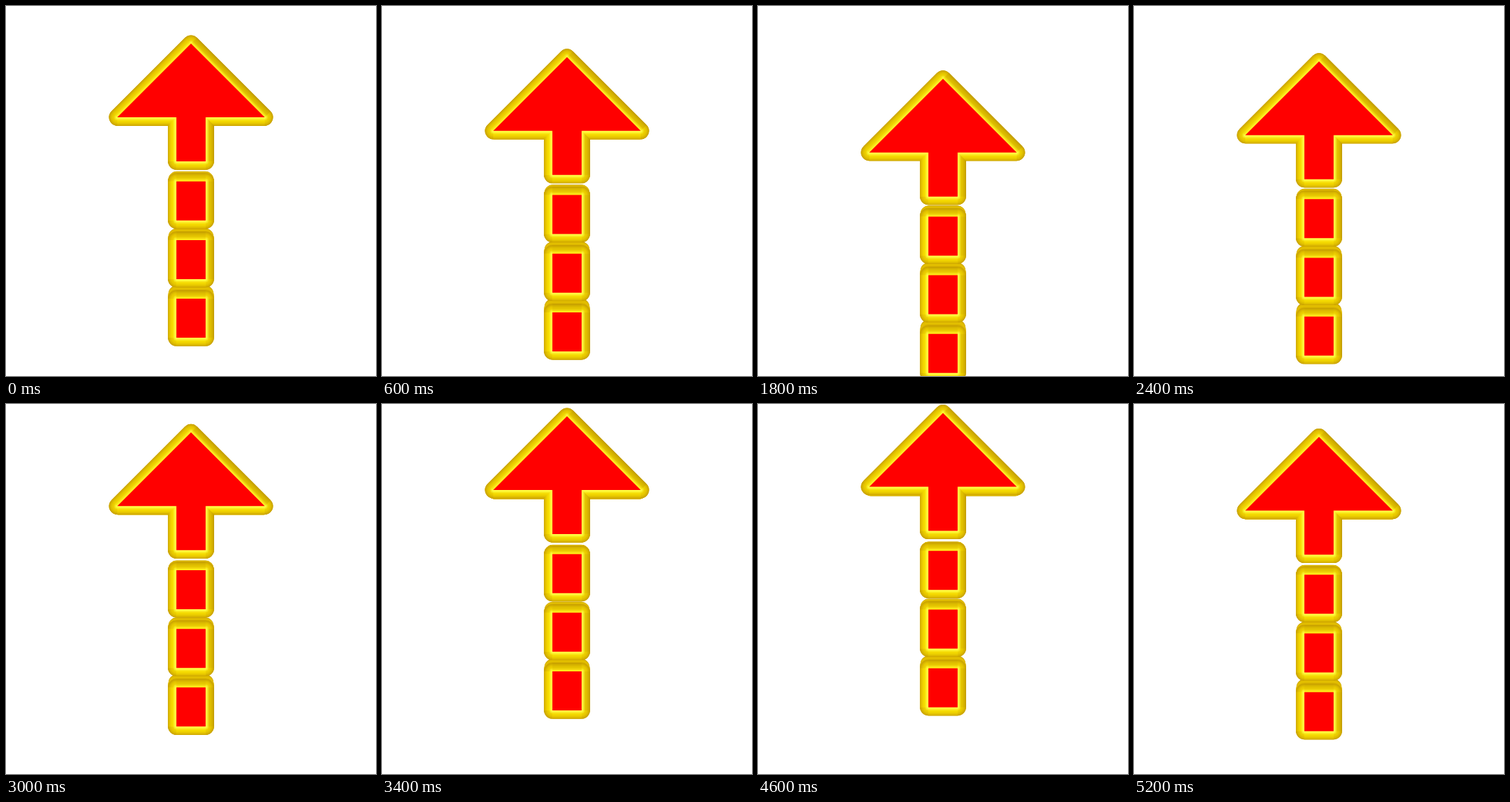
These frames come from a looping animation (512x512 px, 5300 ms). An HTML page with a canvas:

```html
<!DOCTYPE html>
<html lang="en">
<head>
<meta charset="utf-8">
<title>Bobbing arrow</title>
<style>
  html, body { margin: 0; width: 100%; height: 100%; overflow: hidden; background: #fff; }
  canvas { display: block; width: 100vw; height: 100vh; }
</style>
</head>
<body>
<canvas id="stage" width="512" height="512"></canvas>
<script>
const ctx = document.getElementById('stage').getContext('2d');
const BEVEL = 11.5, DEPTH = 0.029, EYE_Y = 162, SWING = 51.2;
const LEFT = 235.7, RIGHT = 276.3;

const head = [[256, 52], [358, 154], [RIGHT, 154], [RIGHT, 215], [LEFT, 215], [LEFT, 154], [154, 154]];
const blocks = [0, 1, 2].map(i => {
  const top = 242.7 + 81.2 * i, bottom = top + 54;
  return [[LEFT, top], [RIGHT, top], [RIGHT, bottom], [LEFT, bottom]];
});
const shapes = [head, ...blocks];

const mix = (a, b, k) => a.map((v, i) => v + (b[i] - v) * k);
const rgb = c => `rgb(${c.map(Math.round).join()})`;

// Colour of the rounded rim: u runs from the red face (0) to the silhouette (1).
function rimColor(nx, ny, u) {
  const light = 0.5 + 0.5 * (ny * 0.6 - nx * 0.8);
  const inner = mix([255, 255, 70], [255, 228, 10], Math.max(0, -ny));
  const mid = mix([218, 184, 0], [255, 230, 0], light);
  const outer = mix([190, 152, 0], [214, 174, 0], light);
  return rgb(u < 0.45 ? mix(inner, mid, Math.max(0, u - 0.1) / 0.35)
                      : mix(mid, outer, ((u - 0.45) / 0.55) ** 1.6));
}

function trace(points) {
  ctx.beginPath();
  points.forEach(p => ctx.lineTo(...p));
  ctx.closePath();
}

function drawSides(points, shift) {
  for (let step = 8; step >= 0; step--) {
    const k = step / 8, scale = 1 - DEPTH * k;
    const glow = Math.sin(Math.PI * k);
    trace(points.map(([x, y]) => [256 + (x - 256) * scale, EYE_Y + (y + shift - EYE_Y) * scale]));
    ctx.strokeStyle = rgb(mix([204, 164, 0], [228, 192, 0], glow));
    ctx.lineWidth = 2 * BEVEL;
    ctx.stroke();
  }
}

function drawFront(points, shift) {
  const moved = points.map(([x, y]) => [x, y + shift]);
  for (let d = BEVEL; d > 0; d -= 0.5) {
    const u = d / BEVEL;
    ctx.lineWidth = 2 * d;
    ctx.strokeStyle = rimColor(0, 0, u);
    trace(moved);
    ctx.stroke();
    moved.forEach(([x, y], i) => {
      const [ex, ey] = moved[(i + 1) % moved.length];
      const length = Math.hypot(ex - x, ey - y);
      ctx.strokeStyle = rimColor((ey - y) / length, (x - ex) / length, u);
      ctx.beginPath();
      ctx.moveTo(x, y);
      ctx.lineTo(ex, ey);
      ctx.stroke();
    });
  }
  trace(moved);
  ctx.fillStyle = '#f00';
  ctx.fill();
}

// The start pose rests for 400 ms, then the arrow steps every 100 ms.
function draw() {
  const time = performance.now() % 5300;
  const pose = Math.max(0, Math.floor(time / 100) - 3);
  const shift = SWING * Math.sin(2 * Math.PI * pose / 50);
  ctx.clearRect(0, 0, 512, 512);
  ctx.lineJoin = 'round';
  shapes.forEach(s => drawSides(s, shift));
  shapes.forEach(s => drawFront(s, shift));
  requestAnimationFrame(draw);
}
draw();
</script>
</body>
</html>
```
